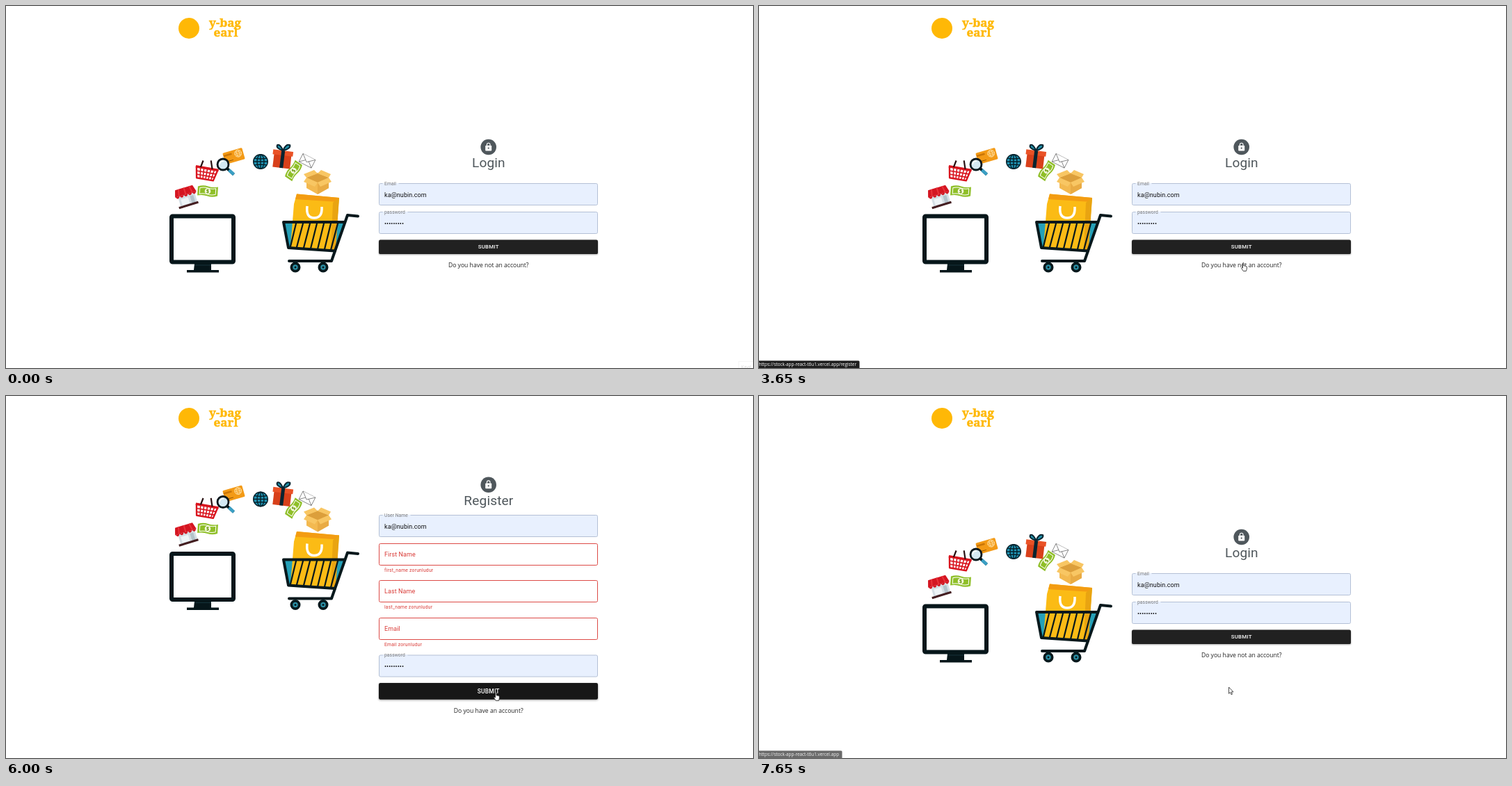
Write an HTML page that moves like this. It is 1074 px wide and 521 px high and loops after 7.99 s.

```html
<!DOCTYPE html>
<html lang="en">
<head>
<meta charset="utf-8">
<title>Login</title>
<style>
html, body { margin: 0; width: 100%; height: 100%; overflow: hidden; background: #fff; }
svg { display: block; width: 1074px; height: 521px; }
text { font: 9px Roboto, sans-serif; letter-spacing: .00938em; }
.logo { font: 900 17px "Noto Serif", serif; letter-spacing: 0; fill: #ffb806; stroke: #ffb806; stroke-width: .5; }
.title { font-size: 19.1px; letter-spacing: .00735em; fill: #4f575c; }
.small { font-size: 6.75px; }
.help { font-size: 6.75px; letter-spacing: .0333em; }
.link { font: 8.6px "Open Sans", sans-serif; letter-spacing: 0; fill: #222; }
.url { font: 6.38px "Open Sans", sans-serif; letter-spacing: 0; }
.submit { font-weight: 500; letter-spacing: .02857em; fill: #fff; }
.mid { text-anchor: middle; }
.button { filter: drop-shadow(0 1px .8px rgba(0,0,0,.32)); }
.button.over { filter: drop-shadow(0 1.5px 1.5px rgba(0,0,0,.4)); }
</style>
</head>
<body>
<svg viewBox="0 0 1074 521">
  <circle cx="263" cy="32" r="15" fill="#ffb806"/>
  <text class="logo mid" x="315" y="30">y-bag</text>
  <text class="logo mid" x="316" y="44">earl</text>

  <g id="art" stroke-linejoin="round">
    <!-- monitor -->
    <rect x="238" y="302.5" width="89" height="66" rx="1.5" fill="#fff" stroke="#06161a" stroke-width="6"/>
    <path d="M271 371H295V380H306V383.5H260V380H270Z" fill="#06161a"/>
    <path d="M271 373H295" stroke="#16333a"/>

    <!-- shop -->
    <g transform="translate(259 273) rotate(-17)">
      <path d="M-12 -2H13V13H-12Z" fill="#d5dfe5"/>
      <path d="M-9 3H2V12H-9Z" fill="#eef4f7"/>
      <path d="M5 2H10V13H5Z" fill="#b3c2ca"/>
      <path d="M-13 -12H13L16 -2H-16Z" fill="#d41521"/>
      <path d="M-8 -12L-10 -2M0 -12V-2M8 -12L10 -2" stroke="#e8323a" stroke-width="2"/>
      <path d="M-15.500 -2q3 6 6.200 0q3 6 6.200 0q3 6 6.200 0q3 6 6.200 0q3 6 6.200 0Z" fill="#d41521"/>
      <path d="M-15 14H14" stroke="#431d20" stroke-width="3"/>
    </g>

    <!-- banknotes -->
    <g id="note" transform="translate(290 266.500) rotate(4)">
      <path d="M-14.500 -6Q-7 -9 0 -7T14.500 -7V6Q7 9 0 7T-14.500 7Z" fill="#8fbf28"/>
      <path d="M-11.500 -4Q-6 -6 0 -4.500T11.500 -4.500V4Q6 6 0 4.500T-11.500 4.500Z" fill="none" stroke="#fff" stroke-width="1"/>
      <circle r="4.300" fill="#f5f8dd"/>
      <path d="M1.500 -1.800Q-2 -2.500 -1.300 -.6Q2.300 .5 1 2Q-1 2.500 -1.800 1.600M0 -3V3" fill="none" stroke="#6e9d16" stroke-width="1"/>
    </g>
    <use href="#note" transform="translate(413.500 237) rotate(-60) scale(.95) translate(-290 -266.500)"/>

    <!-- basket -->
    <g transform="translate(288 237.500) rotate(10)" fill="none" stroke="#d9141e">
      <path d="M-15 -4H16L12 12H-12Z" fill="#fff" stroke-width="2.400"/>
      <path d="M-9 -3L-7 11M-4 -3L-3 11M1 -3V11M6 -3L5 11M11 -3L9 11M-13 2H14M-12 7H13" stroke-width="1.600"/>
      <path d="M-16 -4H17" stroke-width="3.400"/>
      <path d="M-9 -4L-7 -14M8 -4L4 -16" stroke="#2a1113" stroke-width="2.200"/>
    </g>

    <!-- card -->
    <g transform="translate(327.500 216) rotate(-16)">
      <rect x="-14.500" y="-8.500" width="29" height="17" rx="1.500" fill="#f39a16"/>
      <path d="M-14 -4H-2" stroke="#c97508" stroke-width="2.500"/>
      <g fill="none" stroke="#ffe2a6" stroke-width=".8">
        <circle cx="7" cy="-2" r="5"/><ellipse cx="7" cy="-2" rx="2.200" ry="5"/><path d="M2 -2H12M3 -4.500H11M3 .5H11"/>
      </g>
      <path d="M-10 5H-2" stroke="#8b5206" stroke-width="1"/>
    </g>

    <!-- magnifier -->
    <path d="M317 233L327.500 242.500" stroke="#06161a" stroke-width="4"/>
    <path d="M320.500 236L327.500 242.500" stroke="#3a9fc4" stroke-width="4.500"/>
    <circle cx="312" cy="228" r="8" fill="#d3e8f3" stroke="#08171d" stroke-width="2.800"/>
    <path d="M307 228Q308 223 313 223" fill="none" stroke="#fff" stroke-width="1.500"/>

    <!-- globe -->
    <g transform="translate(366 224)" fill="none" stroke="#06222c" stroke-width="1.400">
      <circle r="10.300" fill="#2095b5"/>
      <ellipse rx="5" ry="10.300"/>
      <path d="M0 -10V10M-10 0H10M-9 -5Q0 -3 9 -5M-9 5Q0 3 9 5"/>
    </g>

    <!-- gift -->
    <g transform="translate(397 218) rotate(7)">
      <path d="M-12 -4H13V15H-12Z" fill="#d8401a"/>
      <path d="M-14 -10H15V-3H-14Z" fill="#ea5226"/>
      <path d="M.5 -10V15" stroke="#082430" stroke-width="5"/>
      <path d="M0 -10Q-11 -12 -9 -17Q-5 -19 0 -10Q3 -21 9 -19Q11 -14 0 -10Z" fill="#2090a8" stroke="#082430" stroke-width="2"/>
    </g>

    <!-- envelope -->
    <g transform="translate(433 222.800) rotate(27)" fill="#fff" stroke="#666" stroke-width=".7">
      <path d="M-10 -6.500H10V6.500H-10Z"/>
      <path d="M-10 6.500L-2 -.5M10 6.500L2 -.5" fill="none"/>
      <path d="M-10 -6.500L0 2L10 -6.500"/>
    </g>

    <!-- carton -->
    <path d="M432 247L448 240L464 247V262L448 271L432 262Z" fill="#f3b950"/>
    <path d="M448 254L464 247V262L448 271Z" fill="#e9ab44"/>
    <path d="M432 247L448 241L464 247L448 254Z" fill="#dc9f3b"/>
    <path d="M432 247L428 253L444 260L448 254ZM464 247L468 253L452 260L448 254ZM448 241L443 236L428 242L432 247ZM448 241L453 236L467 242L464 247Z" fill="#f8c663"/>

    <!-- bag and cart -->
    <path d="M400 311H487L473 352L406 348Z" fill="#25a0b8"/>
    <path d="M418 270.500L479 276L473 351L409 347L414 285Z" fill="#fbbb15"/>
    <path d="M418 270.500L479 276L477 282L416 278Z" fill="#f39c12"/>
    <path d="M479 276L470 283L467 351L474 351Z" fill="#e9a411"/>
    <path d="M433 288Q431 305 443 305Q455 305 454 289" fill="none" stroke="#fff" stroke-width="3.500"/>
    <g fill="none" stroke="#07181c" stroke-width="4" stroke-linecap="round">
      <path d="M506 302.500L491 301L468 367H407"/>
      <path d="M487 311H399L406 348L473 352.500"/>
      <path d="M417 313L409 346M427 313L418 347M437 313L428 348M447 313L438 349M457 313L448 350M467 313L458 350M477 313L467 351" stroke-width="2.200"/>
    </g>
    <g fill="#2b8fa5" stroke="#07181c" stroke-width="3.800">
      <circle cx="416" cy="376" r="5.600"/><circle cx="456" cy="376" r="5.600"/>
    </g>
    <g fill="#07181c"><circle cx="416" cy="376" r="1.500"/><circle cx="456" cy="376" r="1.500"/></g>
  </g>

  <g id="form"></g>
  <g id="bar"></g>
  <g id="cursor" stroke-linejoin="round"></g>
</svg>
<script>
const LOOP = 7990, MAIL = 'ka@nubin.com', DOTS = '•'.repeat(9);
const SITE = 'https://stock-app-react-t6u1.vercel.app';
const $ = id => document.getElementById(id);

const CURSORS = {
  arrow: '<path d="M0 0V9.300L2.100 7.400L3.500 10.700L5 10.100L3.600 6.900H6.500Z" fill="#fff" stroke="#222" stroke-width=".8"/>',
  beam: '<path d="M-2 -4.500H-.5L0 -4L.5 -4.500H2M0 -4V4M-2 4.500H-.5L0 4L.5 4.500H2" fill="none" stroke="#222" stroke-width=".9"/>',
  hand: '<path d="M2.500 8V1Q3.300 -.2 4.100 1V5Q5 4.300 5.600 5.300Q6.500 4.700 7 5.700Q8.300 5.200 8.400 6.700V9L7.400 12.500H3.300L.5 8.300Q.6 6.800 2.500 8Z" fill="#fff" stroke="#222" stroke-width=".8"/>'
};

const text = (cls, x, y, str, attrs = '') => `<text class="${cls}" x="${x}" y="${y}" ${attrs}>${str}</text>`;

function field(y, label, { value, hover, error, help } = {}) {
  const fill = value ? '#e8f0fe' : '#fff';
  const tone = error ? '#d93a36' : '#7a7a7a';
  const edge = hover ? '#363a40' : error ? '#dc4a46' : value ? '#b4c0d5' : '#cacaca';
  let out = `<rect x="536.5" y="${y + .5}" width="314" height="31" rx="2" fill="${fill}" stroke="${edge}"/>`;
  if (value) {
    const gap = { Email: 23, password: 36, 'User Name': 40 }[label];
    out += `<path d="M541.5 ${y + .5}h${gap}" stroke="${fill}" stroke-width="1.4"/>`
      + text('small', 544, y + 2.8, label, `fill="${tone}"`)
      + text('', 544, y + 19.5, value, 'fill="#111"');
  } else out += text('', 544, y + 18.5, label, `fill="${tone}"`);
  if (help) out += text('help', 544, y + 40.7, help + ' zorunludur', `fill="${error ? tone : '#858585'}"`);
  return out;
}

const head = (cy, title) => `<circle cx="693.7" cy="${cy}" r="11.3" fill="#4f575c"/>
  <g transform="translate(693.7 ${cy})"><rect x="-4.500" y="-2.300" width="9" height="7.800" rx="1" fill="#fff"/>
  <path d="M-2.300 -2V-3.500a2.300 2.300 0 0 1 4.600 0V-2" fill="none" stroke="#fff" stroke-width="1.100"/>
  <circle cy="1.600" r="1.100" fill="#4f575c"/></g>` + text('title mid', 693.9, cy + 29, title);

const button = (y, h, size, over) =>
  `<rect class="button ${over ? 'over' : ''}" x="536" y="${y}" width="315" height="${h}" rx="2.2" fill="${over ? '#171717' : '#212121'}"/>`
  + text('submit mid', 693.7, y + h / 2 + (h > 22 ? 2.9 : 2.2), 'SUBMIT', `style="font-size:${size}px"`);

const link = (y, words) => text('link mid', 693.7, y, `Do you have ${words} account?`);

const PAGES = {
  login: s => head(203, 'Login')
    + field(255, 'Email', { value: MAIL, hover: s.hover })
    + field(296, 'password', { value: DOTS })
    + button(336.5, 20.6, 7.875, s.over) + link(376.4, 'not an'),
  register: s => head(147, 'Register')
    + ['User Name', 'First Name', 'Last Name', 'Email', 'password']
      .map((label, i) => field(Math.floor(191 + i * 40.5), label, { hover: s.hover && i == 4 })).join('')
    + button(393.4, 23.8, 8.44, s.over) + link(436.6, 'an'),
  checked: s => head(127.700, 'Register')
    + field(171, 'User Name', { value: MAIL })
    + field(212, 'First Name', { help: 'first_name', error: s.error })
    + field(265, 'Last Name', { help: 'last_name', error: s.error })
    + field(319, 'Email', { help: 'Email', error: s.error })
    + field(372.5, 'password', { value: DOTS })
    + button(413, 23.8, 8.44, s.over) + link(455.8, 'an')
};
const SHIFT = { login: 0, register: -56, checked: -75.5 };

const status = (url, width, fill, color) =>
  `<path d="M0 510.5H${width - 1.5}q1.500 0 1.500 1.500V521H0Z" fill="${fill}"/>` + text('url', -.3, 518.2, url, `fill="${color}"`);
const BARS = {
  note: '<rect x="1053.500" y="511.500" width="22" height="12" fill="none" stroke="#f5f5f5"/>' + text('url', 1057, 521.5, 'Kayıt', 'fill="#d8d8d8"'),
  register: status(SITE + '/register', 144.5, '#1e1e1e', '#fff'),
  home: status(SITE, 119.5, '#6a6a6a', '#f2f2f2')
};

// start time, page, cursor, x, y, options
const STEPS = [
  [0, 'login', '', 0, 0, { bar: 'note' }],
  [330, 'login', '', 0, 0],
  [990, 'login', 'arrow', 481, 64],
  [1320, 'login', 'arrow', 777, 400],
  [1650, 'login', 'beam', 737, 280.5, { hover: 1 }],
  [1980, 'login', 'arrow', 712, 334],
  [2310, 'login', 'arrow', 690, 340, { over: 1 }],
  [2640, 'login', 'hand', 689, 340, { over: 1 }],
  [2970, 'login', 'arrow', 694, 379],
  [3310, 'login', 'hand', 693, 378],
  [3650, 'login', 'hand', 693, 369, { bar: 'register' }],
  [3980, 'register', 'beam', 697, 377.5, { hover: 1, bar: 'register' }],
  [4310, 'checked', 'hand', 701, 433, { over: 1 }],
  [6000, 'checked', 'hand', 701, 426, { over: 1, error: 1 }],
  [6660, 'checked', 'hand', 692, 431, { over: 1, error: 1 }],
  [6990, 'checked', 'hand', 678, 446, { error: 1, bar: 'home' }],
  [7320, 'login', 'hand', 678, 446, { bar: 'home' }],
  [7650, 'login', 'arrow', 675.5, 419, { bar: 'home' }]
];

let shown;
function draw(now) {
  const t = now % LOOP;
  const step = STEPS.findLast(s => s[0] <= t);
  if (step != shown) {
    shown = step;
    const [, page, kind, x, y, opts = {}] = step;
    $('art').setAttribute('transform', `translate(0 ${SHIFT[page]})`);
    $('form').innerHTML = PAGES[page](opts);
    $('bar').innerHTML = BARS[opts.bar] || '';
    $('cursor').innerHTML = CURSORS[kind] || '';
    $('cursor').setAttribute('transform', `translate(${x} ${y})`);
  }
}
const start = performance.now();
(function tick() {
  draw(performance.now() - start);
  requestAnimationFrame(tick);
})();
</script>
</body>
</html>
```
